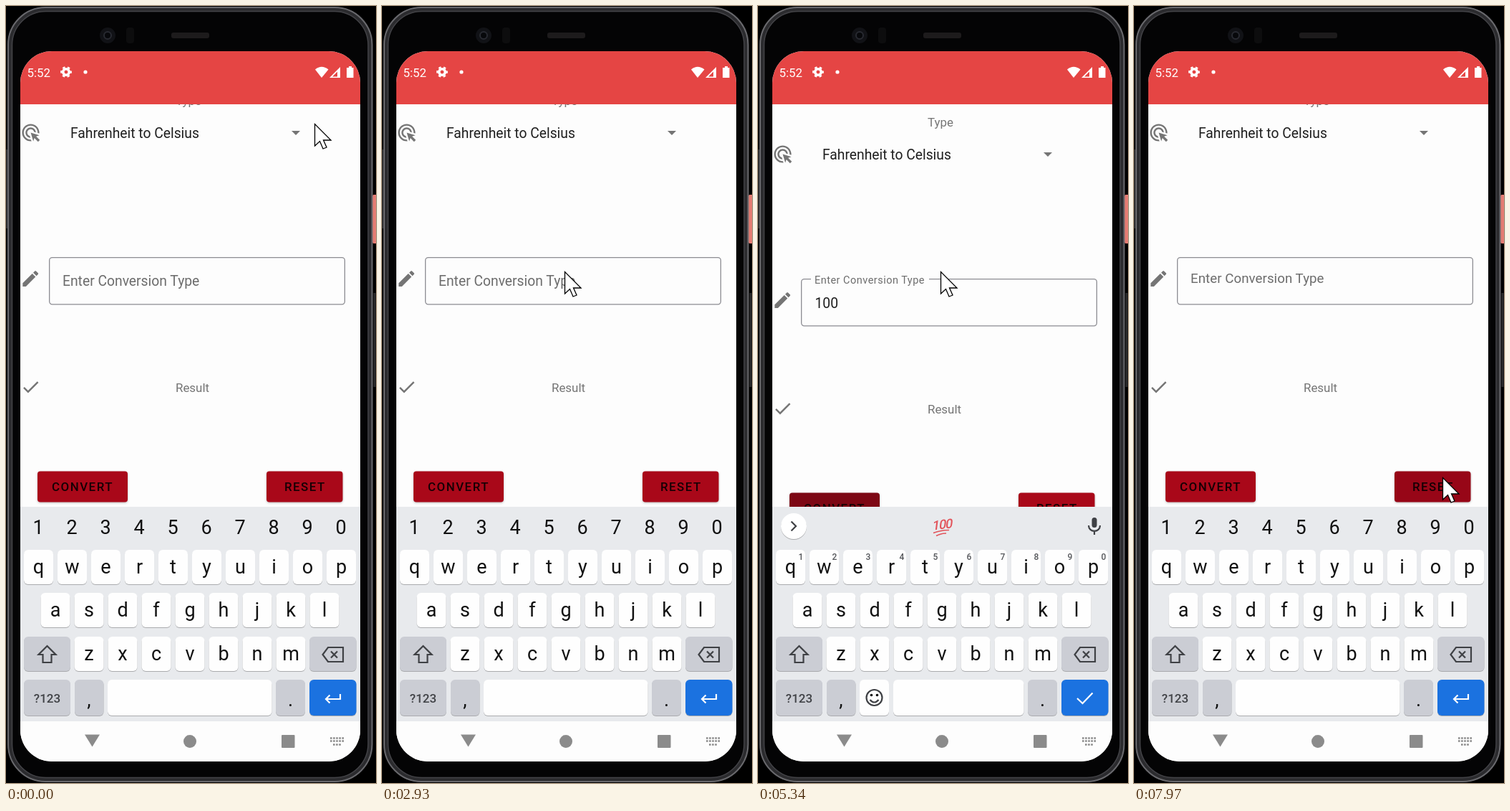
An HTML page for the animation above (8 s loop, 517 by 1083 pixels).

```html
<!DOCTYPE html>
<html lang="en">
<head>
<meta charset="utf-8">
<title>Unit converter demo</title>
<style>
html, body { margin: 0; width: 100%; height: 100%; overflow: hidden; background: #000; }
svg { display: block; width: 517px; height: 1083px; font-family: Roboto, "Liberation Sans", sans-serif; }
.mid { text-anchor: middle; }
.gray { fill: #757575; }
.line { fill: none; stroke: #3f4145; stroke-width: 2.2; }
.white { fill: none; stroke: #fff; stroke-width: 2.2; }
.pink { fill: #d1005c; font-size: 43.5px; text-anchor: middle; }
.button { font-size: 16.9px; font-weight: 500; letter-spacing: 1.5px; fill: #160004; }
.shade { filter: drop-shadow(0 1.5px 1.5px #0004); }
.key { filter: drop-shadow(0 1px 0.5px #0004); }
</style>
</head>
<body>
<svg viewBox="0 0 517 1083">
  <defs>
    <clipPath id="glass"><rect x="20" y="63" width="475" height="990" rx="44"/></clipPath>
    <clipPath id="page"><rect x="20" y="137" width="475" height="561"/></clipPath>
  </defs>

  <!-- phone body -->
  <rect width="517" height="1083"/>
  <path d="M1 200V310M515 400V531" stroke="#2b2b2c" stroke-width="3"/>
  <rect x="512" y="263" width="8" height="68" rx="2" fill="#e47c73"/>
  <rect x="5.5" y="4.5" width="503.500" height="1074" rx="50" fill="#040405" stroke="#2b2b2e" stroke-width="6"/>
  <rect x="3" y="2" width="508.500" height="1079" rx="52" fill="none" stroke="#69696d" stroke-width="2"/>
  <rect x="8.500" y="7.500" width="497.500" height="1068" rx="47" fill="none" stroke="#434347" stroke-width="1.500"/>
  <circle cx="142" cy="41" r="11" fill="#111216"/>
  <circle cx="142" cy="41" r="5" fill="#07080b" stroke="#282a31" stroke-width="2"/>
  <rect x="168" y="30" width="11" height="22" rx="4" fill="#0d0d0e"/>
  <rect x="231" y="37" width="53" height="8" rx="3" fill="#1d1b1c"/>

  <g clip-path="url(#glass)">
    <rect x="20" y="63" width="475" height="990" fill="#fdfdfd"/>

    <g clip-path="url(#page)"><g id="content">
      <rect x="20" y="-130" width="475" height="67" fill="#a90819" class="shade"/>
      <text x="39" y="-87" font-size="24.2" font-weight="500" fill="#fff">Clever Measures</text>
      <text x="246.500" y="31" class="pink">Clever Measures</text>
      <text x="255" y="138" font-size="16.900" class="gray mid">Type</text>
      <path class="gray" transform="translate(20 162) scale(1.21)" d="M11.71 17.99C8.530 17.840 6 15.220 6 12c0-3.310 2.690-6 6-6 3.220 0 5.840 2.530 5.990 5.710l-2.100-.63C15.480 9.310 13.890 8 12 8c-2.210 0-4 1.790-4 4 0 1.890 1.310 3.480 3.080 3.890zM22 12c0 .3-.01.6-.04.9l-1.970-.59L20 12c0-4.420-3.580-8-8-8s-8 3.580-8 8 3.580 8 8 8l.31-.01.59 1.970L12 22C6.480 22 2 17.520 2 12S6.480 2 12 2s10 4.480 10 10zm-3.770 4.260L22 15l-10-3 3 10 1.260-3.770 4.270 4.270 1.980-1.980z"/>
      <text x="90" y="184" font-size="19.300" fill="#1f1f1f">Fahrenheit to Celsius</text>
      <path d="M399 174h12l-6 6z" class="gray"/>
      <path class="gray" transform="translate(19.700 365.500) scale(1.210)" d="M3 17.250V21h3.750L17.810 9.940l-3.750-3.750zM20.710 7.040c.39-.39.39-1.020 0-1.410l-2.340-2.340c-.39-.39-1.020-.39-1.410 0l-1.830 1.830 3.750 3.750z"/>
      <rect id="field" rx="4" fill="none"/>
      <rect id="notch" x="74" y="348" width="165" height="6" fill="#fdfdfd"/>
      <text id="label" x="79">Enter Conversion Type</text>
      <text id="input" x="79.500" y="391" font-size="19.350" fill="#1f1f1f"></text>
      <path class="gray" transform="translate(20 516.500) scale(1.210)" d="M9 16.200 4.800 12l-1.400 1.400L9 19 21 7l-1.400-1.400z"/>
      <text x="260.500" y="538" font-size="16.900" class="gray mid">Result</text>
      <text id="result" x="257" y="599" class="pink">37.77778</text>
      <rect id="convert" x="44" y="648.500" width="126" height="43" rx="4" class="shade"/>
      <text x="64" y="676" class="button">CONVERT</text>
      <rect id="reset" x="364" y="648.500" width="106.500" height="43" rx="4" class="shade"/>
      <text x="389" y="676" class="button">RESET</text>
    </g></g>

    <!-- status bar -->
    <rect x="20" y="63" width="475" height="74" fill="#e54544"/>
    <g fill="#fff">
      <text x="29.500" y="99" font-size="16.900">5:52</text>
      <circle cx="84" cy="92" r="4.300" fill="none" stroke="#fff" stroke-width="3.600"/>
      <circle cx="84" cy="92" r="6.700" fill="none" stroke="#fff" stroke-width="2.400" stroke-dasharray="3.500 3.516" stroke-dashoffset="1.750"/>
      <circle cx="111" cy="92" r="2.600"/>
      <path d="M432 88.500Q441 81 450.500 88.500L441 100z"/>
      <path d="M467 85V100H452z"/>
      <path d="M463 91.500V98.500H456z" fill="#e54544"/>
      <path d="M476 86h3v-2h4v2h2.500v14H476z"/>
    </g>

    <!-- keyboard -->
    <rect x="20" y="698" width="475" height="299" fill="#e8eaed"/>
    <g id="keys" font-size="27" class="mid" fill="#111"></g>
    <path class="line" d="M57.500 892 69.500 904H63.500V915H51.500V904H45.500z"/>
    <path class="line" d="M450 894H471V914H450L442.500 904zM454 899.500l9 9m0-9-9 9"/>
    <text x="57.500" y="971" font-size="17" font-weight="500" class="mid" fill="#414347">?123</text>

    <g id="digits" font-size="27" class="mid" fill="#111">
      <path class="white" d="M467 959V966H447M452.500 960.500 447 966 452.500 971.500"/>
    </g>

    <g id="typing">
      <g id="hints" font-size="12" font-weight="500" class="mid" fill="#55575b"></g>
      <path class="white" d="M446 965 453.500 972 467.500 957.500"/>
      <circle cx="162.500" cy="964" r="11" class="line"/>
      <path class="line" d="M156.500 967Q162.500 974 168.500 967"/>
      <circle cx="158.500" cy="960.500" r="1.800"/><circle cx="166.500" cy="960.500" r="1.800"/>
      <circle cx="50" cy="725" r="18" fill="#fff" class="key"/>
      <path id="chevron" class="line" d="M53.500 718.500 47 725 53.500 731.500"/>
      <rect x="466.500" y="713" width="7" height="14" rx="3.500" fill="#3f4145"/>
      <path class="line" d="M462 724C462 734.500 478 734.500 478 724M470 732V737"/>
      <g id="tools">
        <circle cx="110.500" cy="722" r="6.500" class="line"/>
        <path class="line" d="M115 727 123 735"/>
        <path class="line" d="M174 715.500H187.500Q189.500 715.500 189.500 717.500V727.500L183 734H174Q172 734 172 732V717.500Q172 715.500 174 715.500zM189 727H183V733.500M176 726Q179 730 183 727"/>
        <circle cx="177" cy="721.500" r="1.500"/><circle cx="184" cy="721.500" r="1.500"/>
        <text x="248.500" y="731" font-size="18" font-weight="900" letter-spacing=".8" class="mid" fill="#4b4d52">GIF</text>
        <path class="line" d="M309 716H326V735H309zM313 717V720H322V717M312.500 724.500H322.500M312.500 728H322.500M312.500 731.500H319"/>
        <circle cx="317.500" cy="715.500" r="2.500" fill="#3f4145"/>
        <path d="M359.500 711V738" stroke="#c9cabf"/>
        <g fill="#3f4145"><circle cx="394.500" cy="725" r="2.600"/><circle cx="402" cy="725" r="2.600"/><circle cx="409.500" cy="725" r="2.600"/></g>
      </g>
      <g id="hundred" fill="#e2545b">
        <text transform="translate(257 729) rotate(-7) skewX(-14)" font-size="18" font-weight="500" class="mid" letter-spacing="-1">100</text>
        <path d="M245 734.500Q256 730.500 267 730.500M249 738.500Q256 735 263 735" fill="none" stroke="#e2545b" stroke-width="1.600"/>
      </g>
    </g>

    <!-- navigation bar -->
    <rect x="20" y="997" width="475" height="56" fill="#fdfdfd"/>
    <g fill="#8b8b8b">
      <path d="M110 1015.500H131L120.500 1032.500z"/>
      <circle cx="257" cy="1025" r="9"/>
      <rect x="385" y="1016" width="18.500" height="18" rx="1"/>
      <path d="M453 1020.500H472M453 1024.500H472M457 1029.500H468" stroke="#8b8b8b" stroke-width="2.400" stroke-dasharray="2.600 1.500"/>
    </g>
  </g>
  <path id="pointer" d="M0.500 0.500V31L7.500 24.500 12 35 17 33 12.500 23H23z" fill="#fff" stroke="#000" stroke-width="1.300"/>
</svg>

<script>
const LOOP = 8000;
const TAP = 3250, TEXT_KEYS = 3420, NEXT = 5175, DIGIT_KEYS = 5400, RESULT = 6250, RESET = 7888;
const el = Object.fromEntries([...document.querySelectorAll('[id]')].map(e => [e.id, e]));

const key = (x, y, w, h, fill = '#fefefe') =>
  `<rect x="${x}" y="${y}" width="${w}" height="${h}" rx="6" fill="${fill}" class="key"/>`;
const glyph = (x, y, char) => `<text x="${x}" y="${y}">${char}</text>`;
const DARK = '#cbcdd4';

let keys = '';
[['qwertyuiop', 45.5, 758], ['asdfghjkl', 69, 818], ['zxcvbnm', 116, 879]].forEach(([row, x0, y]) =>
  [...row].forEach((char, i) => {
    const x = x0 + 47 * i;
    keys += key(x - 20.5, y, 41, 48) + glyph(x, y + 33, char);
  }));
keys += key(25, 879, 65, 48, DARK) + key(424, 879, 65.5, 48, DARK) + key(25, 939, 65, 50, DARK)
  + key(96, 939, 40.5, 50, DARK) + key(377, 939, 41, 50, DARK) + key(424, 939, 65.5, 50, '#1b72e0')
  + glyph(116, 976, ',') + glyph(397.5, 976, '.');
el.keys.innerHTML = keys;

[...'1234567890'].forEach((char, i) => {
  const x = 45 + 47 * i;
  el.digits.innerHTML += glyph(x, 736, char);
  el.hints.innerHTML += glyph(x + 15, 772, char);
});
el.digits.innerHTML += key(142, 939, 229.5, 50);
el.typing.innerHTML = key(142, 939, 41, 50) + key(189, 939, 182.5, 50) + el.typing.innerHTML;
for (const id of ['chevron', 'tools', 'hundred']) el[id] = document.getElementById(id);

const path = [
  [0, 431, 164], [760, 331, 43], [1800, 331, 43], [2700, 255, 370], [5500, 255, 370],
  [6100, 107, 665], [6400, 107, 665], [7040, 408, 587], [7450, 431, 657], [LOOP, 431, 657]
];
const clamp = v => Math.min(1, Math.max(0, v));
const easeOut = (t, start, length, power) => 1 - (1 - clamp((t - start) / length)) ** power;
const mix = (a, b, p) => a + (b - a) * p;
const show = (e, on) => e.setAttribute('display', on ? 'inline' : 'none');
const set = (e, attrs) => { for (const name in attrs) e.setAttribute(name, attrs[name]); };

function pointerAt(t) {
  const i = path.findIndex(p => p[0] > t);
  const [t0, x0, y0] = path[i - 1], [t1, x1, y1] = path[i];
  const p = (t - t0) / (t1 - t0), s = p * p * (3 - 2 * p);
  return [mix(x0, x1, s), mix(y0, y1, s)];
}

// The outline grows inwards from a fixed outer edge.
function drawField(color, width) {
  set(el.field, {
    x: 60 + width / 2, y: 350 + width / 2, width: 414 - width, height: 66.5 - width,
    stroke: color, 'stroke-width': width
  });
}

function draw(t) {
  const pan = Math.round(267 * (easeOut(t, TAP, 250, 2) - easeOut(t, NEXT, 250, 2)));
  set(el.content, { transform: `translate(0 ${pan})` });

  const focused = t >= TAP && t < NEXT;
  const typed = '100'.slice(0, [4050, 4300, 4480].filter(at => t >= at).length);
  const lift = easeOut(t, TAP, 167, 3) - easeOut(t, RESET, 167, 3);
  if (focused) drawField('#a90819', 2.6);
  else drawField('#8c8c92', 1.3);
  set(el.label, {
    y: mix(390, 357, lift), 'font-size': mix(19.3, 14.5, lift),
    'letter-spacing': 0.48 * lift, fill: focused ? '#a90819' : '#6c6c6c'
  });
  show(el.notch, t >= TAP && t < RESET);
  el.input.textContent = t < RESET ? typed : '';
  show(el.result, t >= RESULT && t < RESET);
  set(el.convert, { fill: t >= NEXT && t < RESET ? '#7d0714' : '#a90819' });
  set(el.reset, { fill: t >= RESET - 40 ? '#970617' : '#a90819' });

  const typing = t >= TEXT_KEYS && t < DIGIT_KEYS;
  show(el.typing, typing);
  show(el.digits, !typing);
  show(el.tools, !typed);
  show(el.hundred, typed === '100');
  set(el.chevron, { transform: typed ? 'rotate(180 50 725)' : '' });
  set(el.pointer, { transform: `translate(${pointerAt(t)})` });
}

const start = performance.now();
function tick() {
  draw((performance.now() - start) % LOOP);
  requestAnimationFrame(tick);
}
tick();
</script>
</body>
</html>
```
